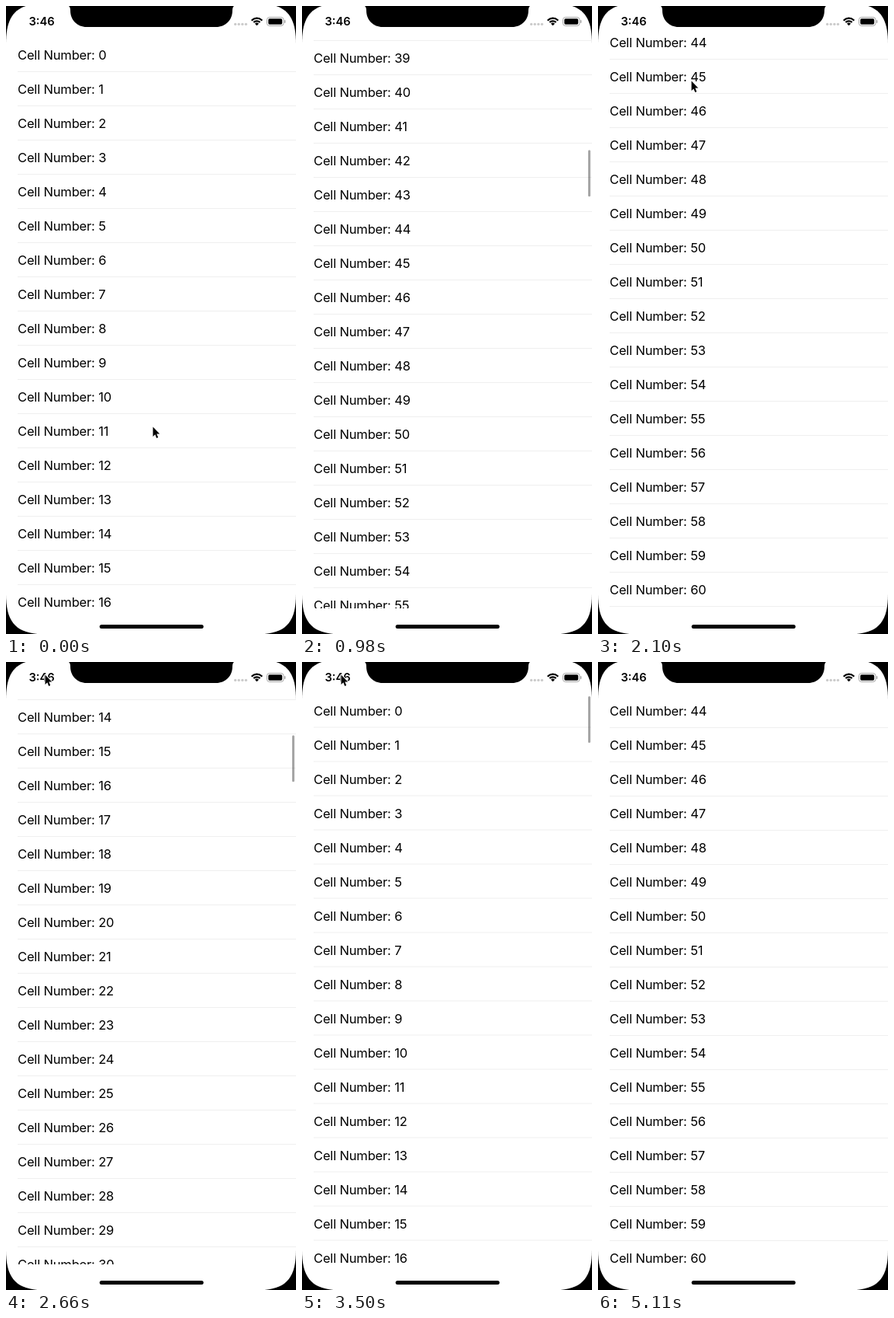
These frames come from a looping animation (374x808 px, 5.32 s). An HTML page with a canvas:

```html
<!DOCTYPE html>
<html lang="en">
<head>
<meta charset="utf-8">
<title>Scrolling list</title>
<style>
html, body { margin: 0; width: 100%; height: 100%; overflow: hidden; background: #000; }
canvas { display: block; }
</style>
</head>
<body>
<canvas id="stage" width="374" height="808"></canvas>
<script>
const W = 374, H = 808, LOOP = 5320, STEP = 70;
const TOP = 40, BOTTOM = 775, ROW = 44, ROWS = 200;
const RELEASE = 282, CAUGHT = 1400, MARK = 44 * ROW;
const ctx = document.getElementById('stage').getContext('2d');

const clamp = u => Math.max(0, Math.min(1, u));
const smooth = u => { u = clamp(u); return u * u * (3 - 2 * u); };

// Flick with friction: the speed decays with a 500 ms time constant.
const glide = t => 2134.3 * (1 - Math.exp((170 - t) / 500));

function scrollAt(t) {
  let s;
  if (t < RELEASE) s = glide(RELEASE) * clamp((t - 70) / (RELEASE - 70)) ** 1.7;
  else if (t < 2471) s = glide(Math.min(t, CAUGHT));
  else if (t < 3400) s = glide(CAUGHT) * (1 - smooth((t - 2471.45) / 300));
  else s = MARK * smooth((t - 3497.2) / 300);
  return Math.round(s * 2) / 2;
}

// time, x, y of the pointer tip
const path = [
  [0, 189, 541], [70, 189, 541], [RELEASE, 212, 541 - glide(RELEASE)], [350, 218, -50],
  [980, 222, -40], [1330, 228, 219.5], [1820, 228, 219.5], [2310, 50, 16],
  [4200, 50, 16], [4270, 57, 24.5], [4340, 239, 768], [4760, 239, 768],
  [5110, 240, 812], [LOOP, 240, 812]
];

function pointerAt(t) {
  if (t < RELEASE) return [189 + 23 * clamp((t - 70) / 212), 541 - scrollAt(t)];
  const i = path.findIndex(p => p[0] > t);
  const [t0, x0, y0] = path[i - 1], [t1, x1, y1] = path[i];
  const u = smooth((t - t0) / (t1 - t0));
  return [x0 + (x1 - x0) * u, y0 + (y1 - y0) * u];
}

const touches = [[70, RELEASE], [1320, 1470], [2380, 2520], [3290, 3430]];
const isTouching = t => touches.some(([a, b]) => t >= a && t < b);

// shown from, fade start, fade end
const barTimes = [[70, 1400, 1470], [2490, 2950, 3250], [3490, 3800, 3990]];
function barAlpha(t) {
  const span = barTimes.find(([a, , c]) => t >= a && t < c);
  return span ? 1 - clamp((t - span[1]) / (span[2] - span[1])) : 0;
}

function pill(x, y, w, h, r, color) {
  ctx.fillStyle = color;
  ctx.beginPath();
  ctx.roundRect(x, y, w, h, r);
  ctx.fill();
}

function label(text, x, y, font, spacing) {
  ctx.font = font + ' Inter, Roboto, sans-serif';
  ctx.letterSpacing = spacing;
  ctx.fillStyle = '#000';
  ctx.fillText(text, x, y);
}

// Rectangle with continuous corners: each curve spans L, its handles end at c.
function screenPath(x0, y0, x1, y1, L = 52, c = 14) {
  const p = new Path2D();
  p.moveTo(x0, y0 + L);
  p.bezierCurveTo(x0, y0 + c, x0 + c, y0, x0 + L, y0);
  p.lineTo(x1 - L, y0);
  p.bezierCurveTo(x1 - c, y0, x1, y0 + c, x1, y0 + L);
  p.lineTo(x1, y1 - L);
  p.bezierCurveTo(x1, y1 - c, x1 - c, y1, x1 - L, y1);
  p.lineTo(x0 + L, y1);
  p.bezierCurveTo(x0 + c, y1, x0, y1 - c, x0, y1 - L);
  return p;
}
const screenShape = screenPath(0, -3.5, W, 808.5);

function drawList(s, alpha) {
  ctx.save();
  ctx.beginPath();
  ctx.rect(0, TOP + 1, W, BOTTOM - TOP - 1);
  ctx.clip();
  const first = Math.max(0, Math.floor(s / ROW) - 1);
  for (let n = first; n < Math.min(ROWS, first + 20); n++) {
    const y = TOP + n * ROW - s;
    label('Cell Number: ' + n, 15, y + 29, '16.5px', '-0.16px');
    ctx.fillStyle = '#efefef';
    ctx.fillRect(15, y + ROW, W - 15, 1);
  }
  if (alpha) pill(369, 44 + s * 0.0825, 3, 60, 1.5, `rgba(0,0,0,${0.35 * alpha})`);
  ctx.restore();
}

function drawNotch() {
  ctx.fillStyle = '#000';
  ctx.beginPath();
  ctx.moveTo(81, 0);
  ctx.quadraticCurveTo(83, 1.5, 83, 6);
  ctx.bezierCurveTo(83, 18, 92, 27, 104, 27);
  ctx.lineTo(271, 27);
  ctx.bezierCurveTo(283, 27, 292, 18, 292, 6);
  ctx.quadraticCurveTo(292, 1.5, 294, 0);
  ctx.fill();
}

function drawStatus() {
  label('3:46', 29.5, 25, '600 14.7px', '0px');
  for (let i = 0; i < 4; i++) pill(294 + i * 4.6, 21.7, 3.4, 3.4, 1.7, '#cbcbcb');

  // Wi-Fi fan
  ctx.strokeStyle = '#000';
  ctx.lineWidth = 2.2;
  for (const r of [9.3, 5.7]) {
    ctx.beginPath();
    ctx.arc(323.5, 25, r, -Math.PI * 0.76, -Math.PI * 0.24);
    ctx.stroke();
  }
  ctx.fillStyle = '#000';
  ctx.beginPath();
  ctx.moveTo(323.5, 25.3);
  ctx.arc(323.5, 25, 3.4, -Math.PI * 0.76, -Math.PI * 0.24);
  ctx.fill();

  // Battery
  ctx.strokeStyle = '#a6a6a6';
  ctx.lineWidth = 1;
  ctx.beginPath();
  ctx.roundRect(336.5, 14.5, 21.5, 11, 3.2);
  ctx.stroke();
  pill(338.3, 16.3, 17.9, 7.4, 1.6, '#000');
  pill(359, 18, 1.4, 4, 0.7, '#a6a6a6');
}

const arrow = new Path2D('M.5 .5V13L3.3 10.3L5.2 15L7.2 14.1L5.3 9.5H9.2Z');

function drawPointer(t) {
  const [x, y] = pointerAt(t);
  if (isTouching(t)) {
    ctx.strokeStyle = '#000';
    ctx.lineWidth = 1.5;
    ctx.beginPath();
    ctx.arc(x, y + 0.5, 21.5, 0, 7);
    ctx.stroke();
  }
  ctx.save();
  ctx.translate(x, y);
  ctx.lineJoin = 'round';
  ctx.strokeStyle = '#fff';
  ctx.lineWidth = 2;
  ctx.stroke(arrow);
  ctx.fillStyle = '#000';
  ctx.fill(arrow);
  ctx.restore();
}

function draw(t) {
  ctx.fillStyle = '#000';
  ctx.fillRect(0, 0, W, H);
  ctx.fillStyle = '#fff';
  ctx.fill(screenShape);
  ctx.save();
  ctx.clip(screenShape);
  drawList(scrollAt(t), barAlpha(t));
  ctx.restore();
  drawNotch();
  drawStatus();
  pill(120.7, 796, 134, 5, 2.5, '#000');
  drawPointer(t);
}

const start = performance.now();
function tick() {
  const t = (performance.now() - start) % LOOP;
  draw(Math.floor(t / STEP) * STEP);
  requestAnimationFrame(tick);
}
tick();
</script>
</body>
</html>
```
